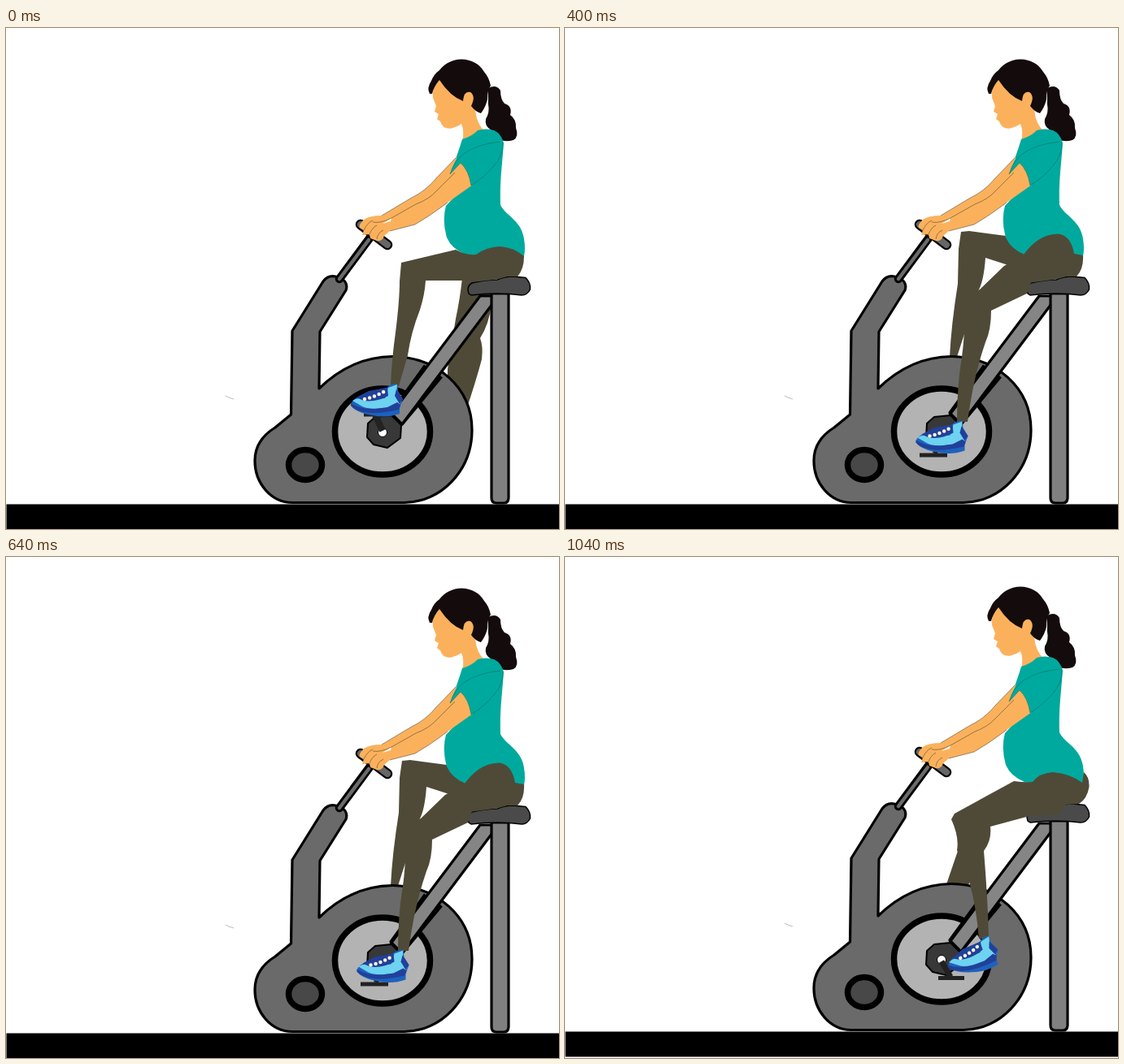
Recreate the animation shown at these times as an HTML page. Size 680 by 617 pixels, loop 1.2 s.

```html
<!DOCTYPE html>
<html lang="en">
<head>
<meta charset="utf-8">
<title>Stationary bike</title>
<style>
  html, body { margin: 0; width: 100%; height: 100%; overflow: hidden; background: #fff; }
  svg { display: block; width: 100vw; height: 100vh; }
  .pants { fill: #4f4a37; }
  .skin { fill: #fbb15c; }
  .shirt { fill: #00a99d; }
  .hair { fill: #140b0c; }
  .thin { fill: none; stroke: #3a3025; stroke-width: .5; }
  .round { fill: none; stroke-linecap: round; }
</style>
</head>
<body>
<svg viewBox="0 0 680 617" preserveAspectRatio="none">
  <g id="scene">
    <path d="M270 453 L274 455 L280 457" class="thin" style="stroke:#777"/>
    <path id="backLeg" class="pants"/>
    <rect x=".5" y="586.500" width="680" height="31"/>

    <g id="bike" stroke="#000" stroke-width="3.200" stroke-linejoin="round">
      <path fill="#6a6a6a" d="M385 444 Q425 405 475 404.500 C530 405 573 443 573 495 C573 545 535 584 490 584.500 L352 584.500 C325 584 306 560 306 533 C306 512 318 500 331 492 L350.500 476 L352 373 L390 312 Q396 304 405 306 L413 309 Q421 314 418 323 L386 374 Z"/>
      <ellipse cx="463" cy="497" rx="58.500" ry="53" fill="#b3b3b3" stroke-width="7.500"/>
      <ellipse cx="368" cy="538" rx="20.500" ry="18.500" fill="#484848" stroke-width="7.500"/>
      <path class="round" stroke-width="10.500" stroke-linecap="butt" d="M447 259 L410 309"/>
      <path class="round" stroke="#6a6a6a" stroke-width="4.500" stroke-linecap="butt" d="M446 261 L410 309"/>
      <path class="round" stroke-width="12.500" d="M436 242 L469 267"/>
      <path class="round" stroke="#666" stroke-width="8" d="M436 242 L469 267"/>
      <path stroke-width="5" d="M516 416 L474 474 L487 487 L535 429"/>
      <path fill="#858585" d="M583 330 L474 475 L487 488 L598 340 L601 330 Z"/>
      <path fill="#808080" d="M597 327 H618 V579 Q617.500 585 612 585 H603 Q597 585 597 579 Z"/>
      <path fill="#383838" stroke-width="2" d="M454 479 L474 477 L486 489 L485 505 L469 517 L452 513 L444 504 L445 487 Z"/>
      <circle cx="463" cy="498" r="5.500" fill="#fff" stroke-width="1"/>
    </g>
    <path id="crank" fill="none" stroke="#222"/>
    <path id="pedal" fill="none" stroke="#222" stroke-width="5"/>

    <g id="rider">
      <path class="hair" d="M593 74 Q603 69 608 77 Q608 88 613 93 Q623 96 620 107 Q628 113 627 123 Q631 134 624 138 Q614 141 606 137 Q598 133 597 126 Q588 121 590 112 Q595 104 593 94 Z"/>
      <path class="skin" d="M533 63 Q523 73 525 86 L529 96 L527 103 L532 106 L530 112 L534 115 Q537 125 548 123.500 Q555 122 560 118 Q564 127 561 140 L590 128 Q579 120 577 101 L575 76 Z"/>
      <path class="hair" d="M521 81 Q517 74 523 65 Q526 57 533 52 Q543 39 560 38.500 Q579 39 588 54 Q594 61 596 71 Q592 76 592 88 Q590 97 584 105 Q577 103 572 96 Q578 84 571 79 Q563 77 562 90 Q546 84 533 64 Q526 72 524 81 Z"/>
      <path class="shirt" d="M561 137 Q574 133 580 126 Q590 123 600 126 Q609 130 612 142 C610 170 607 190 608 218 C615 232 634 237 637 260 Q639 272 637 281 L610 278 Q590 285 565 279 Q548 272 542 258 Q536 237 541 219 L568 190 L546 179 Q555 157 561 137 Z"/>
      <path class="skin" d="M553 160 L529 185 Q516 201 497 210 L462 231 Q447 231 440 236 Q433 243 435 246 L440 249 L438 255 L447 254 L448 259 L456 262 Q463 263 465 256 L472 250 L503 242 Q522 231 543 215 L574 193 L563 166 Z"/>
      <path d="M463 241 L474 234 L473 238 Z" fill="#fff"/>
      <path class="thin" d="M553 160 L529 185 Q516 201 497 210 L462 231 M552 178 L529 201 Q520 211 504 217 L474 234 Q460 241 451 239 M440 249 Q444 240 451 237 M447 254 Q450 246 456 243 M456 260 Q457 252 464 249 M472 250 L503 242 Q522 231 543 215"/>
      <path class="shirt" d="M546 180 Q552 161 562 150 L611 140 Q612 157 599 171 Q588 184 572 194 Q569 175 559 166 Z"/>
      <path class="thin" style="stroke:#06665f" d="M546 180 Q552 162 564 154 Q580 143 608 140 M546 180 L559 166 Q569 175 572 194 Q588 184 599 171 Q612 157 611 140"/>
    </g>

    <path fill="#4a4a4a" stroke="#000" stroke-width="1.500" d="M569 327 Q566 318 573 314 Q590 310 604 310 Q613 306 624 306 L639 307.500 Q645.500 314 644.500 322 Q641 329 634 329 Q604 325 572 329 Z"/>
    <path id="frontLeg" class="pants"/>

    <g id="shoe">
      <path fill="#1d62bd" d="M468 443 Q475 437 481 438.500 L482 447 L488 457 L484 468 L484 475 Q467 481 451 477 Q431 474 424 465 Q424 460 430 456 L445 448 Z"/>
      <path fill="#6dd3f0" d="M426 459 Q433 454 440 458 L466 456 L470 443 L481 439 L480 450 L486 460 L481 468 L463 468 Q446 470 438 466 Z"/>
      <path fill="#21409a" d="M431 455 L446 447 L469 443 L470 453 Q456 461 440 459 Z"/>
      <path fill="#21409a" d="M424 462 Q436 470 455 469 L469 467 L481 461 L485 464 L483 470 Q462 475 447 474 Q429 472 424 465 Z"/>
      <path fill="#21409a" d="M480 445 L488 457 L484 463 L478 453 Z"/>
      <path class="round" stroke="#fff3dc" stroke-width="4.500" stroke-dasharray="0 6.200" d="M441 457 Q455 454 466 447"/>
    </g>
  </g>
</svg>
<script>
const el = id => document.getElementById(id);
const STEP = 400;

const poses = [
  {
    lift: 0,
    back: "M561 308 Q558 335 553 358 L543 420 L543 470 L566 470 Q577 438 585 408 Q587 392 583 382 Q594 365 597 340 L600 308 Z",
    front: "M486 289 L553 273 Q565 280 578 279 Q590 270 607 269 Q624 270 637 281 Q637 297 629 306 L616 306 L604 309.500 L573 313 L560 311 L516 311 Q515 328 509 347 Q498 375 494 403 L483 441 L473 441 Q474 410 479 375 Q484 335 484 312 Z",
    crank: "M463 496 L454 477", pedal: "M440 476 L472 476", crankWidth: 8,
    shoe: "translate(0 0)"
  },
  {
    lift: 0,
    back: "M487 251 L497 250 L542 256 L575 282 L548 293 L517 283 Q515 312 508 324 L490 380 L482 405 L473 405 Q475 365 483 315 L484 272 Z",
    front: "M540 293 L564 279 Q582 254 606 253.500 Q622 255 626 278 L637 280 Q638 297 629 306 L616 306 L604 309.500 L573 313.500 L568 327 L524 348 Q524 372 517 387 Q502 430 495 485 L482 485 Q482 440 488 405 Q493 368 490 342 Q498 329 510 322 Z",
    crank: "M463 500 L455 524", pedal: "M436 526 L470 526", crankWidth: 6,
    shoe: "translate(7.500 45.500)"
  },
  {
    lift: -2,
    back: "M486 340 L483 364 L468 408 L495 408 L508 380 L505 345 Z",
    front: "M479 318 L552 278 Q566 280 575 279 Q583 268 600 267 Q622 269 636 280 L638 267 Q645 273 644.500 285 Q642 300 632 306 L616 307 L608 319 L571 321 L523 334 Q525 351 515 364 Q518 400 520 440 L521 472 L509 472 Q506 436 498 405 Q489 380 482 363 Q485 347 475 325 Z",
    crank: "M463 500 L474 519", pedal: "M459 520.500 L491 520.500", crankWidth: 7,
    shoe: "translate(40.500 31) rotate(-13 478 440)"
  }
];

function draw(time) {
  const pose = poses[Math.floor(time / STEP) % poses.length];
  el("scene").setAttribute("transform", `translate(0 ${pose.lift})`);
  el("backLeg").setAttribute("d", pose.back);
  el("frontLeg").setAttribute("d", pose.front);
  el("crank").setAttribute("d", pose.crank);
  el("crank").setAttribute("stroke-width", pose.crankWidth);
  el("pedal").setAttribute("d", pose.pedal);
  el("shoe").setAttribute("transform", pose.shoe);
}

const start = performance.now();
function tick() {
  draw(performance.now() - start);
  requestAnimationFrame(tick);
}
tick();
</script>
</body>
</html>
```
